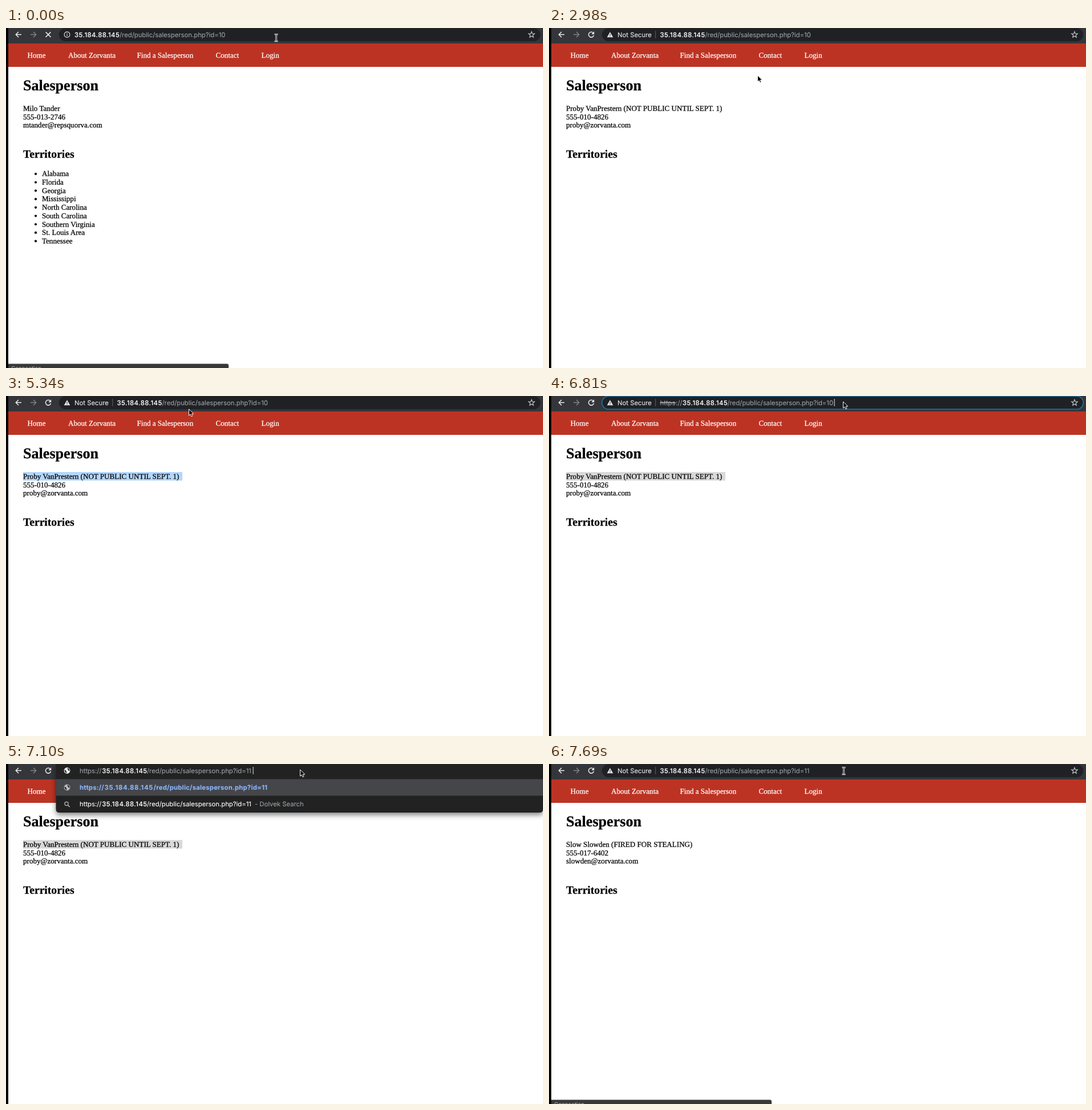
Animation, 941 px wide and 595 px high, one loop 7990 ms. Source, as an HTML page:

```html
<!DOCTYPE html>
<html lang="en">
<head>
<meta charset="utf-8">
<title>Salesperson page</title>
<style>
  html, body { margin: 0; width: 100%; height: 100%; overflow: hidden; background: #fff; }
  svg { display: block; width: 941px; height: 595px; }
  text { white-space: pre; text-rendering: geometricPrecision; }
  .serif { font: 13.07px "Liberation Serif", "Times New Roman", serif; stroke-width: 0.25px; }
  .h1 { font-size: 26.1px; font-weight: 700; }
  .h2 { font-size: 19.6px; font-weight: 700; }
  .ui { font: 11.3px Inter, "Liberation Sans", sans-serif; stroke-width: 0.12px; }
  .host { font-weight: 500; letter-spacing: 0.04em; }
  .bold { font-weight: 700; letter-spacing: 0.02em; }
  .bold.host { letter-spacing: 0.06em; }
  .small { font-size: 9.8px; }
</style>
</head>
<body>
<svg id="stage" viewBox="0 0 941 595" xmlns="http://www.w3.org/2000/svg"></svg>
<script>
const LOOP = 7990;
const HOST = '35.184.88.145';
const PATH = '/red/public/salesperson.php?id=';
const GREY = '#9aa0a6', LIGHT = '#e8eaed', DARK = '#202124', BAR = '#35363a';

const people = [
  ['Milo Tander', '555-013-2746', 'mtander@repsquorva.com'],
  ['Proby VanPrestern (NOT PUBLIC UNTIL SEPT. 1)', '555-010-4826', 'proby@zorvanta.com'],
  ['Slow Slowden (FIRED FOR STEALING)', '555-017-6402', 'slowden@zorvanta.com']
];
const territories = ['Alabama', 'Florida', 'Georgia', 'Mississippi', 'North Carolina',
  'South Carolina', 'Southern Virginia', 'St. Louis Area', 'Tennessee'];
const menu = [[37.5, 'Home'], [109, 'About Zorvanta'], [229.5, 'Find a Salesperson'],
  [367.5, 'Contact'], [447.5, 'Login']];

const arrow = (x, y) => ({ cursor: ['arrow', x, y] });
const beam = (x, y) => ({ cursor: ['beam', x, y] });
const BLUE = '#b3d7fe', FADED = '#d9d9d9';

// Each step changes part of the state and holds until the next one.
const steps = [
  [0, { person: 0, id: '10', bar: 'info', loading: true, status: 1, mark: null, ring: false, ...beam(473.5, 17) }],
  [150, { bar: 'page' }],
  [290, { person: 1 }],
  [440, { loading: false }],
  [740, { status: 0.45 }],
  [880, { status: 0 }],
  [2080, beam(477, 17)],
  [2230, arrow(478, 11)],
  [2980, arrow(365.5, 83)],
  [3120, arrow(290, 128)],
  [3270, arrow(230, 152)],
  [3410, beam(221.5, 140.5)],
  [3710, { mark: [217, 38, BLUE] }],
  [3860, { mark: [30, 279, BLUE] }],
  [4460, arrow(204, 112)],
  [4610, arrow(292, 66)],
  [4750, arrow(368, 38)],
  [5050, arrow(352, 33)],
  [5200, arrow(334, 27)],
  [5340, arrow(320.5, 23)],
  [5490, arrow(372, 18)],
  [5630, arrow(458, 13)],
  [5780, arrow(508, 11)],
  [5920, { bar: 'all', ring: true, mark: [30, 279, FADED], ...arrow(514, 10) }],
  [6070, arrow(515.5, 10)],
  [6520, { bar: 'edit' }],
  [6950, { bar: 'typed', ring: false, id: '1' }],
  [7100, { id: '11' }],
  [7250, { bar: 'info', loading: true }],
  [7400, { status: 1, ...beam(516.5, 12) }],
  [7540, { bar: 'page' }],
  [7690, { person: 2, loading: false, mark: null }]
];

const states = [];
steps.forEach(([, change], i) => states.push({ ...states[i - 1], ...change }));

const text = (x, y, str, cls, fill) =>
  `<text x="${x}" y="${y}" class="${cls}" fill="${fill}" stroke="${fill}">${str}</text>`;
const serif = (x, y, str, fill = '#000', cls = '') => text(x, y, str, 'serif ' + cls, fill);
const ui = (x, y, str, fill, cls = '') => text(x, y, str, 'ui ' + cls, fill);
const rect = (x, y, w, h, fill, extra = '') =>
  `<rect x="${x}" y="${y}" width="${w}" height="${h}" fill="${fill}" ${extra}/>`;
const line = (d, color, width = 1.5) =>
  `<path d="${d}" fill="none" stroke="${color}" stroke-width="${width}"/>`;
const at = (x, y, body) => `<g transform="translate(${x} ${y})">${body}</g>`;

const globe = (x, y, color) => at(x, y,
  `<circle r="5.4" fill="${color}"/>` +
  `<path d="M-4.4 -1.4 Q-1 0 -1.6 1.4 Q0 2 -1 4.4 Q-4.3 3 -4.4 -1.4Z
    M1 -4.4 Q0 -2 2 -1.6 Q2 .6 4.3 .8 Q4.7 -2.8 1 -4.4Z" fill="${DARK}"/>`);

const back = line('M5 0H-4.4M0 -4.7L-4.7 0L0 4.7', LIGHT);
const forward = line('M-5 0H4.4M0 -4.7L4.7 0L0 4.7', '#7f8185');
const cross = line('M-4.4 -4.4L4.4 4.4M4.4 -4.4L-4.4 4.4', LIGHT);
const reload = line('M3.4 -3.1A4.6 4.6 0 1 0 4.5 1.2', LIGHT) +
  `<path d="M5.2 -5.4V-.6H.4Z" fill="${LIGHT}"/>`;
const info = `<circle r="4.9" fill="none" stroke="${LIGHT}" stroke-width="1.1"/>` +
  line('M0 -.6V2.6M0 -2.7V-1.5', LIGHT, 1.2);
const warning = `<path d="M0 -4.9L5.3 4.3H-5.3Z" fill="${LIGHT}"/>` +
  line('M0 -1.6V1.2M0 2V3.1', DARK, 1.1);
const star = line(Array.from({ length: 10 }, (_, i) => {
  const r = i % 2 ? 2.4 : 5.6, a = i * Math.PI / 5;
  return (i ? 'L' : 'M') + (r * Math.sin(a)).toFixed(2) + ' ' + (-r * Math.cos(a)).toFixed(2);
}).join('') + 'Z', '#c9ccd0', 1.1);
const lens = `<circle cx="-1" cy="-1" r="3.1" fill="none" stroke="#c0c3c7" stroke-width="1.2"/>` +
  line('M1.4 1.4L4.7 4.7', '#c0c3c7', 1.4);

const cursors = {
  arrow: `<path d="M0 0V11.2L2.6 8.8L4.4 12.8L6.4 11.9L4.7 8.1H8.2Z" fill="#000"
    stroke="#fff" stroke-width="1" stroke-linejoin="round"/>`,
  beam: ['#fff', '#111'].map((c, i) =>
    line('M-3 -6Q0 -6 0 -4.4Q0 -6 3 -6M0 -5V5M-3 6Q0 6 0 4.4Q0 6 3 6M-1.6 2.2H1.6', c, i ? 0.8 : 2.4)).join('')
};

const url = (hostX, pathX, id, y = 15.6, hostFill = '#fff', pathFill = GREY, cls = '') =>
  ui(hostX, y, HOST, hostFill, 'host ' + cls) + ui(pathX, y, PATH + id, pathFill, cls);
const caret = x => rect(x, 5, 1, 13, LIGHT);
const notSecure = at(107, 12, warning) + ui(120, 15.6, 'Not Secure', LIGHT) +
  rect(186.2, 5, 1, 13, '#5f6368');

function secureUrl(id, selected) {
  const dim = selected ? '#fff' : GREY;
  return notSecure +
    (selected ? rect(194, 4, 306, 15, '#3f638b') : '') +
    ui(194.5, 15.6, 'https', dim) + rect(194.5, 11.2, 28, 1.1, selected ? '#fff' : '#c4c7cb') +
    ui(222.3, 15.6, '://', dim) + url(234, 312.7, id, 15.6, '#fff', dim) +
    (selected ? '' : caret(499.6));
}

function dropdown(id) {
  const link = '#8ab4f8', full = id.length > 1;
  return `<path d="M87.5 0H941V79Q941 85 935 85H93.5Q87.5 85 87.5 79Z" fill="${DARK}" filter="url(#shade)"/>` +
    rect(87.5, 26.5, 853.5, 29, '#45464a') +
    globe(107, 11.5, LIGHT) + ui(129, 15.6, 'https://', GREY) + url(168.3, 247, id) +
    caret(full ? 432.6 : 427) +
    globe(107, 41, '#b4b7bb') + ui(129, 45, 'https://', link, 'bold') +
    url(172.6, 258.6, id, 45, link, link, 'bold') +
    at(107, 70.5, lens) + ui(129, 74.4, 'https://', '#fff') +
    url(168.3, 247, id, 74.4, '#fff', '#fff') +
    ui(full ? 436 : 430, 74.4, '- Dolvek Search', GREY);
}

const bars = {
  info: id => at(107, 11.5, info) + url(120, 199, id),
  page: id => notSecure + url(194.5, 273.5, id),
  all: id => secureUrl(id, true),
  edit: id => secureUrl(id, false),
  typed: dropdown
};

function page(s) {
  const lines = people[s.person].map((str, i) => serif(30, 144.8 + i * 14.7, str)).join('');
  const list = s.person ? '' : territories.map((str, i) => {
    const y = 259.3 + i * 14.7;
    return `<circle cx="52" cy="${y - 4}" r="2.1"/>` + serif(63, y, str);
  }).join('');
  const mark = s.mark ? rect(s.mark[0], 133, s.mark[1], 15, s.mark[2]) : '';
  return rect(4, 26, 937, 42, '#bc3323') +
    menu.map(([x, str]) => serif(x, 52.3, str, '#fff')).join('') +
    serif(30, 109, 'Salesperson', '#000', 'h1') + mark + lines +
    serif(30, 226.6, 'Territories', '#000', 'h2') + list;
}

function toolbar(s) {
  const ring = s.ring ? 'stroke="#226a94" stroke-width="1.8"' : '';
  return rect(4, 0, 937, 27, BAR) +
    at(22, 11.5, back) + at(48, 11.5, forward) + at(74, 11.5, s.loading ? cross : reload) +
    rect(92.8, 0.3, 843.6, 22.9, DARK, `rx="11.45" ${ring}`) + at(921, 11.8, star) +
    bars[s.bar](s.id);
}

const status = s => !s.status ? '' : `<g opacity="${s.status}">` +
  `<path d="M4 587.7H387Q390 587.7 390 591V596H4Z" fill="#38383b" filter="url(#soft)"/>` +
  ui(9, 599.2, 'Connection...', '#a2a5a9', 'small') + '</g>';

const defs = `<defs>
  <filter id="shade" x="-5%" y="-20%" width="110%" height="150%">
    <feDropShadow dx="0" dy="4" stdDeviation="5" flood-color="#000" flood-opacity=".5"/></filter>
  <filter id="soft" x="-5%" y="-100%" width="110%" height="300%">
    <feDropShadow dx="0" dy="0" stdDeviation="1.5" flood-color="#000" flood-opacity=".25"/></filter>
</defs>`;

const stage = document.getElementById('stage');

function render(s) {
  const [kind, x, y] = s.cursor;
  stage.innerHTML = defs + rect(0, 0, 941, 595, '#fff') + page(s) + toolbar(s) + status(s) +
    rect(0, 0, 4, 595, '#000') + at(x, y, cursors[kind]);
}

let shown = -1;
const start = performance.now();
function tick() {
  const t = (performance.now() - start) % LOOP;
  const i = steps.findLastIndex(([from]) => from <= t);
  if (i !== shown) render(states[shown = i]);
  requestAnimationFrame(tick);
}
tick();
</script>
</body>
</html>
```
